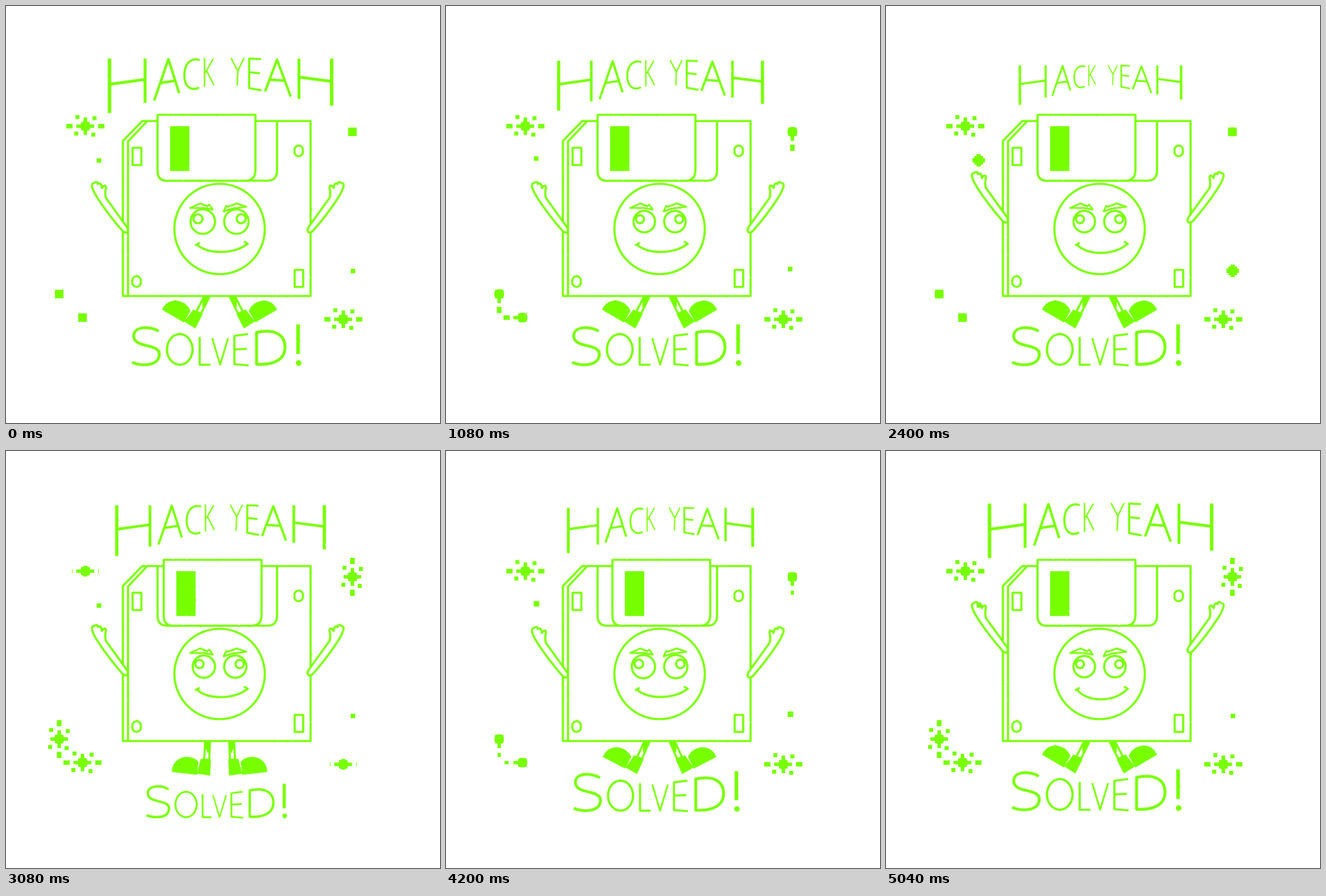
These frames come from a looping animation (763x734 px, 5120 ms). An HTML page:

```html
<!DOCTYPE html>
<html lang="en">
<head>
<meta charset="utf-8">
<title>Hack yeah, solved!</title>
<style>
html, body { margin: 0; width: 100%; height: 100%; overflow: hidden; background: #fff; }
#stage { display: block; stroke: #7f0; stroke-width: 3.7; fill: none; stroke-linejoin: round; }
.solid { fill: #7f0; stroke: none; }
.paper { fill: #fff; }
</style>
</head>
<body>
<svg id="stage" width="763" height="734" viewBox="-.5 -.5 763 734" role="img" aria-label="HACK YEAH SOLVED!">
  <defs>
    <filter id="rough" filterUnits="userSpaceOnUse" x="0" y="0" width="763" height="734" color-interpolation-filters="sRGB">
      <feTurbulence type="fractalNoise" baseFrequency=".25" numOctaves="1" seed="4"/>
      <feDisplacementMap in="SourceGraphic" scale="2" xChannelSelector="R" yChannelSelector="G"/>
    </filter>
    <g id="leg">
      <path class="paper" d="M349.500 511L347 543H356L358 511"/>
      <path class="solid" d="M348 510H360L358 522 354 532 350 522ZM341 541L359 543 357 571 334 567ZM290 563C291 534 325 531 337 546L334 569Z"/>
    </g>
    <path id="arm" class="paper" d="M213 390L175 337Q173 330 175 320Q176 313 170 317L168 320Q167 309 161 313Q161 307 154 311Q149 312 151 319Q154 328 160 337Q180 368 205 396Q212 401 214 395Z"/>
  </defs>

  <g filter="url(#rough)">
    <g id="title">
      <path stroke-width="6" d="M181.500 92V188M572 92V175"/>
      <path stroke-width="5" d="M244 92V170M514.500 92V163M184 137L242 129M517 125L570 132"/>
      <path stroke-width="4.300" d="M260 166L285 93 304 153M455 150L476 94 500 159M270 135L297 131M461 129L491 131"/>
      <path d="M340 95C328 90 313 98 313 121C313 142 325 150 339 143M448 93L427 92V144L449 148M427 116L446 118"/>
      <path stroke-width="2.500" d="M348.500 91V142M364 92L350 117M352 113L365 139M395 91L407 114 418 91M407 114L406 140"/>
    </g>

    <use id="legL" href="#leg"/>
    <use id="legR" href="#leg"/>

    <path class="paper" d="M239 202L205 237V510H535V202Z"/>
    <path d="M247 203L214 238V510M266 202V290Q266 307 283 307H459Q476 307 476 289V202"/>
    <g id="shutter">
      <path class="paper" d="M266 191H438V288Q438 307 420 307H282Q266 307 266 290Z"/>
      <rect class="solid" x="288" y="211" width="34" height="79"/>
    </g>
    <path d="M222 249H237.500V279.500H222ZM507 464H522V494H507Z"/>
    <rect x="506.500" y="245" width="15" height="19" rx="7.500"/>
    <rect x="221.500" y="475" width="15" height="19" rx="7.500"/>

    <circle cx="375" cy="392" r="79.500"/>
    <path stroke-width="3" d="M323 355L341 347 353 352 357 349 363 358 348 355ZM422 353L405 347 389 353 387 351 382 361 397 356Z"/>
    <g id="eyes"></g>
    <path id="mouth"/>
    <path d="M332 421L340 416M418 414L426 419"/>

    <use id="armL" href="#arm"/>
    <use id="armR" href="#arm"/>

    <g id="solved">
      <path stroke-width="5" d="M268 572C255 563 224 562 224 580C224 603 270 592 269 613C268 633 240 634 221 627M440 574C475 567 490 580 490 600C490 622 470 632 440 630Z"/>
      <ellipse stroke-width="4" cx="305" cy="604" rx="22.500" ry="27"/>
      <path d="M340 582V631H359M425 577L401 580V630L426 632M401 604L423 603"/>
      <path stroke-width="3" d="M362 584L376 631 390 584"/>
      <path stroke-width="6.500" d="M513 560V612"/>
      <circle class="solid" cx="514" cy="628" r="5"/>
    </g>
  </g>
  <g id="sparkles" class="solid"></g>
</svg>
<script>
const $ = id => document.getElementById(id);
const move = (id, value) => $(id).setAttribute('transform', value);
const LOOP = 5120, TITLE = 1008, ARMS = 1100, BODY = 1320, TWINKLE = LOOP / 3;

const ramp = (u, from, to) => u < from ? 0 : u >= to ? 1 : (u - from) / (to - from);
const hump = (u, up, top, down, end) => ramp(u, up, top) - ramp(u, down, end);
const easeOut = x => 1 - (1 - x) ** 2;
const backOut = x => 1 + 6 * (x - 1) ** 3 + 5 * (x - 1) ** 2;

const box = (x, y, w, h = w) => `M${x - w / 2} ${y - h / 2}h${w}v${h}h${-w}z`;
const cross = (long, short) => box(0, 0, long, short) + box(0, 0, short, long);
const scaleAt = (x, y, s) => `translate(${x} ${y}) scale(${s}) translate(${-x} ${-y})`;
const shape = (x, y, d, angle = 0) =>
  `<path transform="translate(${x} ${y}) rotate(${angle})" d="${d}"/>`;

// Square at 0, one long ray at 1, every ray at 2.
function burst(grow) {
  const ray = ramp(grow, 0, 1), rest = ramp(grow, 1, 2);
  let d = box(0, 0, 15) + cross(15 + 2 * ray, 8);
  if (ray > .3) d += box(0, 11, 6, 10) + box(0, 28, 8 * ray, 11 * ray);
  if (rest) {
    d += cross(31, 6) + box(0, -28, 8 * rest, 11 * rest);
    for (const [x, y] of [[-14, -16], [15, -14], [-16, 14], [13, 16]]) d += box(x, y, 7 * rest);
  }
  return d;
}

function clippedBurst(x, y, inset) {
  const w = 34 - inset, h = 20 - inset;
  return `<svg x="${x - w}" y="${y - h}" width="${2 * w}" height="${2 * h}" viewBox="${-w} ${-h} ${2 * w} ${2 * h}">${shape(0, 0, burst(2), 90)}</svg>`;
}

function sparkles(u) {
  const vanish = ramp(u, 1640, 1680);
  const star = burst(2 * hump(u, 150, 250, 480, 600) + ramp(u, 650, 850) + ramp(u, 1080, 1130) - 2 * vanish);
  const inset = 10.5 * hump(u, 1150, 1373, 1373, 1560) + 4 * vanish;
  const size = 8 + 14 * hump(u, 560, 693, 693, 800) + 5 * vanish;
  const drift = hump(u, 680, 800, 1080, 1300);
  const dx = -5 * drift, dy = -3.5 * drift;
  const dot = size < 15 ? box(0, 0, size) : cross(size, size * .35) + box(0, 0, size * .7);
  return clippedBurst(139, 211, inset) + clippedBurst(592.5, 551, inset)
    + shape(608.5, 221, star) + shape(93, 506.5, star) + shape(134, 548, star, 90)
    + shape(163 + dx, 271.5 + dy, dot) + shape(609.5 + dx, 466 + dy, dot);
}

// Both eyes shrink towards the nose.
function eye(inner, side, s) {
  return `<circle cx="${inner + side * 21.5 * s}" cy="379" r="${21.5 * s}"/>`
    + `<circle cx="${inner + side * 30 * s}" cy="${379 - 5 * s}" r="${8 * s}"/>`;
}

function draw(t) {
  const title = t % TITLE, arms = t % ARMS, body = t % BODY;

  move('title', scaleAt(376, 136, title < 530
    ? 1 - .28 * easeOut(ramp(title, 0, 450))
    : .72 + .28 * backOut(ramp(title, 530, 672))));

  const hop = 1 - .22 * (easeOut(ramp(body, 220, 640)) - ramp(body, 760, 920));
  const swing = (hop - .839) * 141;
  move('solved', scaleAt(370, 708, hop));
  move('legL', `rotate(${swing} 354 508)`);
  move('legR', `translate(750 0) scale(-1 1) rotate(${swing} 354 508)`);

  const lift = 44 * hump(arms, 0, 500, 660, 900);
  move('armL', `translate(0 ${-lift})`);
  move('armR', `translate(743.5 ${-lift}) scale(-1 1)`);
  const chin = 437 + lift * .13;
  $('mouth').setAttribute('d', `M335 419C352 ${chin} 402 ${chin} 424 418`);

  const open = 1 - .12 * hump(body, 0, 600, 1080, BODY);
  $('eyes').innerHTML = eye(367, -1, open) + eye(383, 1, open);

  move('shutter', `translate(${26 * hump(body, 0, 200, 300, 540)} 0)`);
  $('sparkles').innerHTML = sparkles(t % TWINKLE);
}

const start = performance.now();
let shown = -1;
function tick() {
  const step = Math.min(126, Math.floor((performance.now() - start) % LOOP / 40));
  if (step !== shown) draw((shown = step) * 40);
  requestAnimationFrame(tick);
}
tick();
</script>
</body>
</html>
```
